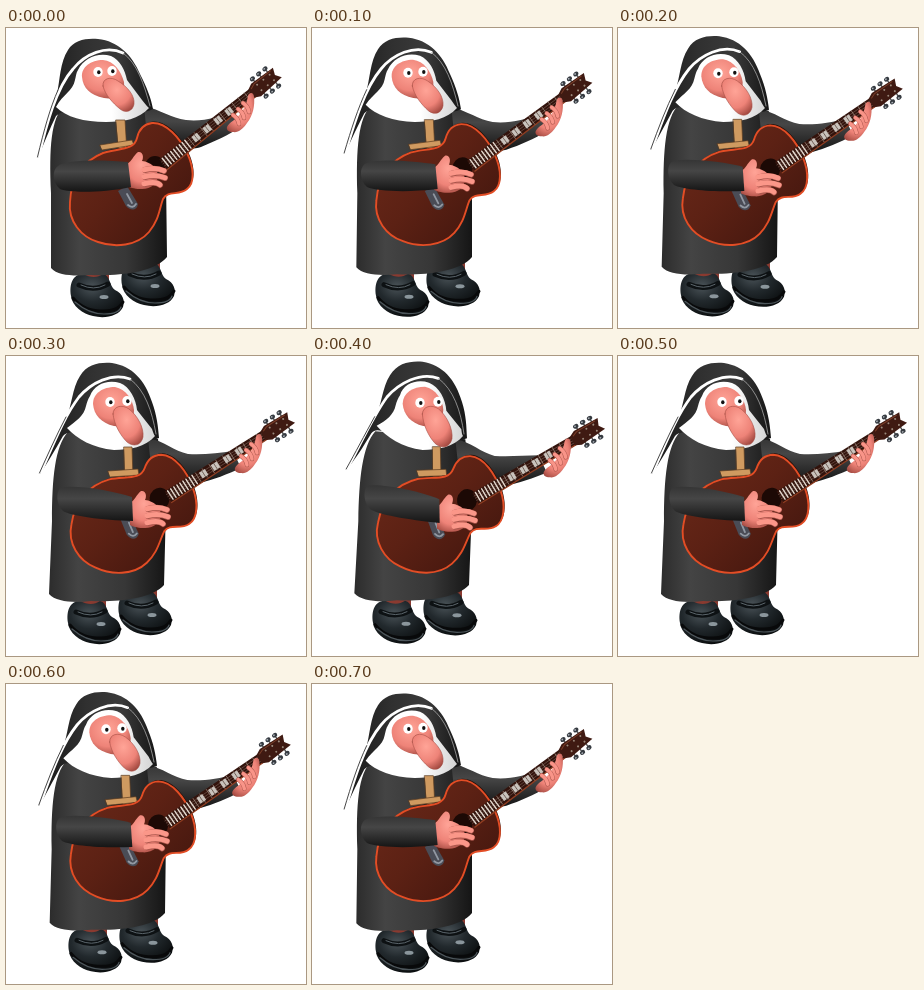
Animation of 300 by 300 pixels, one loop 800 ms. Source, as an HTML page:

```html
<!DOCTYPE html>
<html lang="en">
<head>
<meta charset="utf-8">
<title>Guitar-playing nun</title>
<style>
html, body { margin: 0; width: 100%; height: 100%; overflow: hidden; background: #fff; }
svg { display: block; width: 100%; height: 100%; }
</style>
</head>
<body>
<svg id="stage" viewBox="0 0 300 300" stroke-linecap="round" stroke-linejoin="round">
  <defs>
    <linearGradient id="gown"><stop offset="0" stop-color="#2c2c2c"/><stop offset=".25" stop-color="#444"/><stop offset=".65" stop-color="#373737"/><stop offset="1" stop-color="#151515"/></linearGradient>
    <linearGradient id="sleeve" x2="0" y2="1"><stop offset="0" stop-color="#353535"/><stop offset=".35" stop-color="#464646"/><stop offset="1" stop-color="#151515"/></linearGradient>
    <linearGradient id="veil"><stop offset="0" stop-color="#181818"/><stop offset=".4" stop-color="#303030"/><stop offset=".7" stop-color="#3a3a3a"/><stop offset="1" stop-color="#151515"/></linearGradient>
    <linearGradient id="cloth"><stop offset=".6" stop-color="#fff"/><stop offset="1" stop-color="#d4d4d4"/></linearGradient>
    <linearGradient id="wood" y2=".8"><stop offset="0" stop-color="#6c2a1a"/><stop offset=".5" stop-color="#5c2114"/><stop offset="1" stop-color="#42160e"/></linearGradient>
    <radialGradient id="skin" cx=".45" cy=".35" r=".75"><stop offset="0" stop-color="#ffa497"/><stop offset=".6" stop-color="#ee8378"/><stop offset="1" stop-color="#9c443b"/></radialGradient>
    <radialGradient id="shoe" cx=".4" cy=".3" r=".75"><stop offset="0" stop-color="#4a5358"/><stop offset=".45" stop-color="#22292d"/><stop offset="1" stop-color="#0a0d0e"/></radialGradient>
  </defs>
</svg>
<script>
const stage = document.getElementById('stage');
const moving = [];

function add(tag, attrs, parent = stage) {
  const el = document.createElementNS('http://www.w3.org/2000/svg', tag);
  for (const key in attrs) el.setAttribute(key, attrs[key]);
  parent.append(el);
  return el;
}

// Blend the numbers of two matching strings.
function mix(a, b, k) {
  const ends = b.match(/-?\d*\.?\d+/g);
  let i = 0;
  return a.replace(/-?\d*\.?\d+/g, n => (+n + (ends[i++] - n) * k).toFixed(2));
}

function morph(el, attr, a, b) {
  moving.push(k => el.setAttribute(attr, mix(a, b, k)));
  return el;
}

const shape = (fill, a, b, extra) => morph(add('path', { fill, ...extra }), 'd', a, b);
const group = (a, b) => morph(add('g', {}), 'transform', a, b);
const line = (d, stroke, width, parent) =>
  add('path', { d, stroke, 'stroke-width': width, fill: 'none' }, parent);
const path = (fill, d, parent) => add('path', { fill, d }, parent);
const oval = (fill, cx, cy, rx, ry, parent) => add('ellipse', { fill, cx, cy, rx, ry }, parent);

// Shoes and ankles
function shoe(a, b) {
  const g = group(a, b);
  path('#8a3a30', 'M-15 -28H12V-14H-15Z', g);
  path('url(#shoe)', 'M-26 0C-28 -12 -24 -22 -14 -22C-6 -18 0 -18 6 -22C14 -20 12 -10 18 -6C26 -2 28 4 26 11C22 20 8 23 -4 20C-14 18 -25 10 -26 0Z', g);
  line('M-24 2C-15 13 -5 15 7 15S23 11 26 6', '#08090a', 3, g);
  line('M-22 6Q-8 18 7 18T24 11', '#4d565b', 1.2, g);
  line('M-18 -11Q-3 -4 11 -12', '#0d1113', 5, g);
  line('M-16 -11Q-3 -5 8 -11', '#5b656b', 1, g);
  oval('#8b969c', 7, 1, 4.5, 2, g);
}
shoe('translate(142 257)', 'translate(139 258)');
shoe('translate(91 268)', 'translate(88 267)');

// Gown and far arm
shape('url(#gown)',
  'M58 78C45 90 43 120 45 165L45 240C52 248 68 248 85 247C112 248 148 245 161 229L160 150L148 82Z',
  'M62 76C49 90 46 122 46 165L43 238C50 246 68 247 85 245C112 246 146 243 158 229L160 150L152 83Z');
shape('url(#sleeve)',
  'M138 78C155 82 165 90 180 92C197 94 214 89 228 82L235 98C222 108 209 113 195 119C180 124 155 116 141 108Z',
  'M142 82C158 85 168 95 182 98C197 99 213 97 227 95L235 112C222 118 207 124 193 127C178 128 158 119 145 110Z');

// Veil with its white rim, coif and cross
shape('url(#veil)',
  'M32 130C37 108 44 88 51 66C54 52 54 34 62 22C68 12 80 10 92 11C112 13 126 27 134 46C141 60 145 70 147 81C137 87 118 82 99 84C78 86 60 79 50 88C44 100 38 115 32 130Z',
  'M34 118C42 98 50 82 60 63C66 50 66 32 74 20C81 8 94 6 106 7C126 10 139 24 146 46C151 60 152 70 153 82C140 88 122 83 105 85C84 86 65 70 57 80C49 94 42 106 34 118Z');
shape('none',
  'M33 128C40 98 50 60 67 41C79 26 100 17 117 25',
  'M35 116C46 92 57 62 73 41C85 27 106 16 124 23',
  { stroke: '#fff', 'stroke-width': 2.8 });
shape('none',
  'M117 25C131 35 138 56 144 78',
  'M124 23C139 34 146 55 150 78',
  { stroke: '#bbb', 'stroke-width': .7 });
shape('none',
  'M31.5 129C38 102 44 80 52 62',
  'M33.5 117C42 98 50 80 60 61',
  { stroke: '#333', 'stroke-width': .9 });
shape('url(#cloth)',
  'M72 42C78 30 92 24 105 28C114 32 119 42 121 52L136 72C139 76 142 79 143 80C133 91 118 94 100 94C78 94 60 89 50 79C57 66 67 63 69 52C70 48 70 45 72 42Z',
  'M84 40C88 28 102 23 114 27C124 31 130 43 131 54L146 73C147 76 148 79 149 80C140 91 123 94 108 94C87 92 71 83 61 72C70 65 78 60 80 50C81 46 82 43 84 40Z');
const crossEdge = { stroke: '#5b3b20', 'stroke-width': .7 };
shape('#cf9a60', 'M110 92L119 92L121 125L113 125Z', 'M118 91L126 91L127 122L119 122Z', crossEdge);
shape('#cf9a60', 'M94 117L126 112L128 117L96 122Z', 'M102 115L132 113L133 119L104 121Z', crossEdge);

// Face
shape('url(#skin)',
  'M76 49C75 39 85 32 97 32C108 33 115 43 118 54C120 67 109 72 98 70C84 67 77 60 76 49Z',
  'M87 48C87 37 97 31 109 31C120 33 127 44 128 54C128 67 119 72 108 70C95 67 88 59 87 48Z');
function eye(a, b) {
  const g = group(a, b);
  oval('#fff', 0, 0, 4.7, 5, g);
  oval('#111', .8, .3, 1.7, 2, g);
}
eye('translate(92 44)', 'translate(104 46)');
eye('translate(106 43)', 'translate(121 45)');
shape('url(#skin)',
  'M97 58C96 50 105 48 112 53C122 59 129 68 128 76C127 83 120 86 114 81C107 75 99 67 97 58Z',
  'M107 58C107 50 116 48 123 53C132 60 138 72 137 81C135 90 127 91 121 86C114 79 108 68 107 58Z',
  { stroke: '#a74f46', 'stroke-width': .6 });

// Guitar
const guitar = group('translate(0 0) rotate(0 115 175)', 'translate(1 0) rotate(6 115 175)');
const body = 'M146 95C160 94 174 110 181 125C188 139 189 155 181 161C173 168 162 162 157 171C153 182 153 192 143 204C131 218 109 220 92 214C75 209 62 193 64 174C65 150 77 133 97 125C112 120 128 123 131 110C133 101 138 96 146 95Z';
path('#26100b', body, guitar).setAttribute('transform', 'translate(1 -1.5)');
add('path', { d: body, fill: 'url(#wood)', stroke: '#e34d25', 'stroke-width': 1.9 }, guitar);
oval('#1c0905', 149, 139, 10, 11, guitar);
path('#4a4c56', 'M112 163L121 158L132 176C131 183 124 183 120 178Z', guitar);
line('M121 166L126 175M122 177Q127 181 130 176', '#9298a2', 1.8, guitar);

const neck = add('g', { transform: 'translate(157 136) rotate(-38.5)' }, guitar);
path('#32130c', 'M0 -6L115 -5L115 5L0 7Z', neck);
line('M0 7L115 5', '#8f3c20', 1.3, neck);
for (let x = 3; x < 32; x += 3.6) line(`M${x} -5V5`, '#e8ddd3', 1.4, neck);
for (let x = 36; x < 112; x += 8) line(`M${x} -5V5`, '#9d8a7e', .7, neck);
for (const x of [39, 53, 67, 81]) {
  add('rect', { x, y: -3.5, width: 7, height: 7, fill: '#cbc6c0' }, neck);
  line(`M${x + 3.5} -4V4`, '#5d4b42', .8, neck);
}
for (const y of [-2.5, 0, 2.5]) line(`M0 ${y}H115`, '#b9a599', .3, neck);
for (const x of [123, 131, 139]) for (const side of [-1, 1]) {
  line(`M${x} ${side * 5}V${side * 10}`, '#555', 1.5, neck);
  oval('#353a40', x, side * 11, 2.8, 2.2, neck);
  oval('#a9afb5', x - .6, side * 11.4, 1, .8, neck);
}
path('#3f1a12', 'M113 -5L119 -8L146 -7L143 0L147 6L119 8L113 5Z', neck);
line('M116 -4L121 -6H142', '#7a3d28', 1, neck);
for (const x of [123, 131, 139]) for (const y of [-3.5, 3.5]) oval('#9b8a7c', x, y, 1, 1, neck);

// Fretting hand
const fret = group('translate(0 0)', 'translate(8 13)');
path('url(#skin)', 'M221 99C223 94 230 92 234 86C239 80 241 74 242 68C243 64 248 64 248 69C249 77 247 88 241 95C237 101 232 105 227 104C223 104 220 102 221 99Z', fret);
for (const [x, y] of [[227, 87], [232, 81], [237, 75]]) {
  line(`M${x} ${y}Q${x + 5} ${y + 3} ${x + 6} ${y + 9}`, '#a9554b', 4.4, fret);
  line(`M${x} ${y}Q${x + 5} ${y + 3} ${x + 6} ${y + 9}`, '#f99488', 3.5, fret);
}

// Near arm and strumming hand
const strum = group('translate(0 0)', 'translate(3 11)');
path('url(#skin)', 'M121 136C126 133 127 128 132 124C137 123 138 129 136 133C145 134 151 140 152 147C152 156 144 162 134 161C128 161 123 159 121 158Z', strum);
for (const [x, y] of [[158, 143], [159, 150], [154, 157]]) {
  line(`M139 ${y - 1}Q150 ${y - 4} ${x} ${y}`, '#a9554b', 6, strum);
  line(`M138 ${y - 1.3}Q150 ${y - 4.3} ${x} ${y - .3}`, '#fb9789', 5, strum);
}
shape('url(#sleeve)',
  'M52 138C60 131 100 132 122 134L125 159C95 165 65 165 54 161C46 154 46 142 52 138Z',
  'M54 132C66 128 105 134 126 141L127 165C95 164 65 160 57 155C50 148 50 137 54 132Z');

// Even steps out and back; k passes 1 at the far end of the swing.
function draw(now) {
  const step = Math.floor(now / 100) % 8;
  const k = (4 - Math.abs(4 - step)) / 3;
  for (const update of moving) update(k);
  requestAnimationFrame(draw);
}
draw(0);
</script>
</body>
</html>
```
